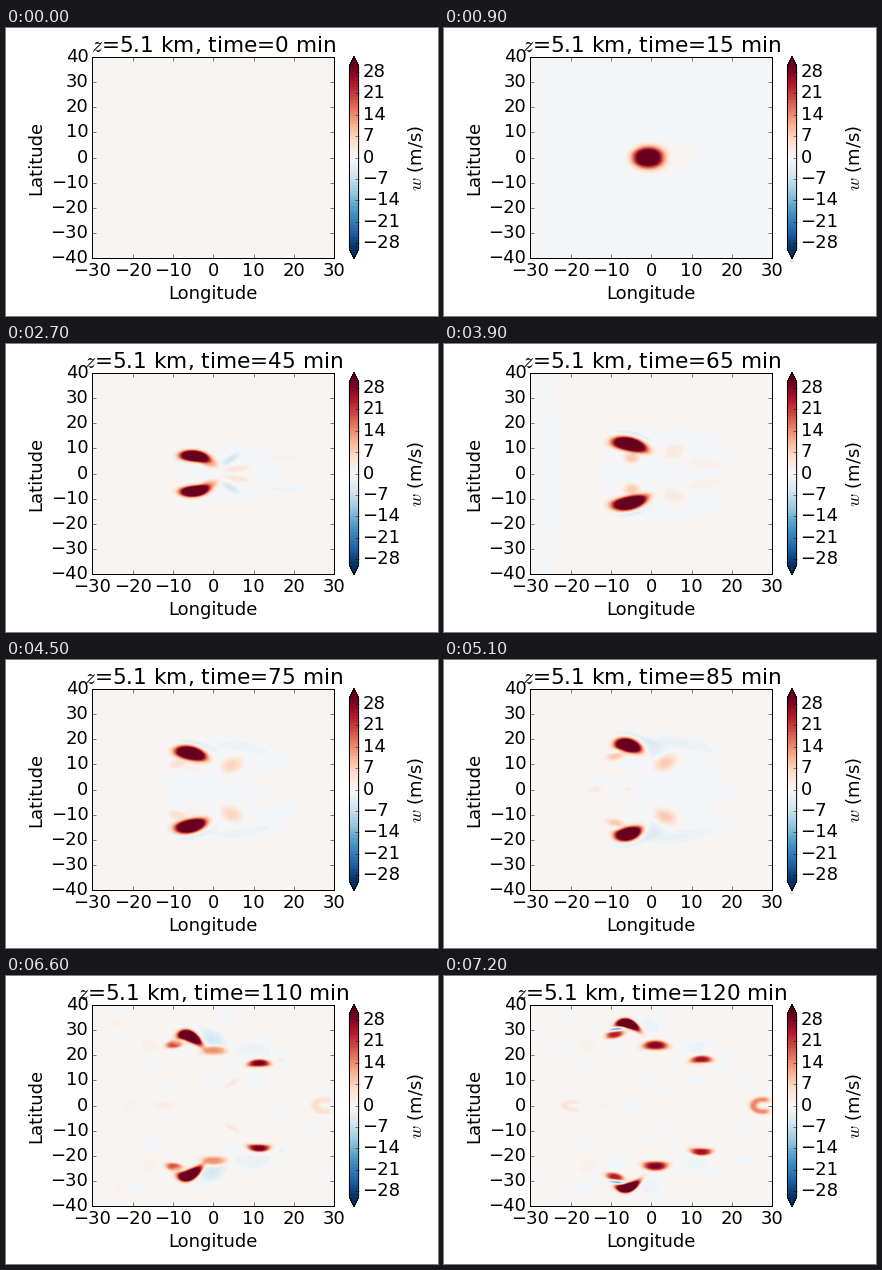
Recreate the animation shown at these times as a matplotlib script. Size 432x288 px, loop 7.5 s.

```python
import numpy as np
import matplotlib.pyplot as plt
from matplotlib.animation import FuncAnimation

plt.style.use("classic")
plt.rcParams.update({
    "font.family": "DejaVu Sans",
    "font.size": 18,
    "mathtext.fontset": "cm",
    "figure.facecolor": "white",
    "savefig.facecolor": "white",
})

FRAMES, INTERVAL, STEP = 25, 300, 5
LEVELS = np.arange(-30, 31)
X, Y = np.meshgrid(np.linspace(-30, 30, 181), np.linspace(-40, 40, 201))


def rise(t, start, end):
    """Smooth step from 0 to 1."""
    s = np.clip((t - start) / (end - start), 0, 1)
    return s * s * (3 - 2 * s)


def pulse(t, start, peak, end):
    return rise(t, start, peak) * (1 - rise(t, peak, end))


def blob(x, y, rx, ry, amp, slope=0, bend=0):
    """Sheared, bent bump; off the equator it is mirrored north to south."""
    u = X - x
    total = 0
    for lat in (Y, -Y) if y else (Y,):
        v = lat - y - slope * u - bend * u**2
        total = total + amp * np.exp(-((u / rx)**2 + (v / ry)**2)**1.5)
    return total


def horseshoe(x, rx, ry, amp, width=0.4):
    """Ring on the equator that opens to the east."""
    u, v = (X - x) / rx, Y / ry
    r = np.hypot(u, v) + 1e-9
    return amp * np.exp(-((r - 1) / width)**2) * (1 - rise(u / r, 0.2, 1))


def background(t):
    """Weak mean motion plus ripples that spread late in the storm."""
    w = 0.25 - 0.65 * rise(t, 0, 5) * (1 - rise(t, 30, 42))
    rng = np.random.default_rng(4)
    ripples = 0
    for _ in range(8):
        kx, ky = rng.uniform(0.15, 0.6, 2)
        phase, speed = rng.uniform(0, 6.3), rng.uniform(-0.06, 0.06)
        ripples = ripples + np.cos(kx * X + phase + speed * t) * np.cos(ky * Y)
    return w + 0.25 * rise(t, 70, 110) * ripples * np.exp(-(X / 32)**4)


def first_updraft(t):
    """Rising bubble with its ring and the sinking wedge in its wake."""
    r = 5 - 0.08 * t
    return (blob(-0.05 * t, 0, r, r + 0.3, 40 * pulse(t, 0, 17, 25))
            + blob(-4.4, 0, 1.1, 2.6, 28 * pulse(t, 15, 24, 35))
            + blob(0.26 * t, 0, 2 + 0.23 * t, 3 + 0.21 * t,
                   4 * pulse(t, 10, 22, 45))
            + blob(0.28 * t, 0, 3.4, 2.8, -9 * pulse(t, 12, 25, 42))
            + blob(2.2, 0, 3, 1.1, -7 * pulse(t, 12, 25, 36)))


def split_cells(t):
    """Pair of storms that drift poleward, with hook, tail and sinking air."""
    s = (t - 25) / 20
    x = -5.9 + 3.3 * np.exp(-max(s, -0.3))
    y = max(2.9 + 4 * s + 0.1 * s**3, 1.5)
    rx = 2.9 + 1.3 * np.exp(-((t - 62) / 20)**2)
    ry = 1.5 + 1.0 * rise(t, 25, 65) - 0.8 * rise(t, 100, 120)
    slope = -0.3 * rise(t, 25, 65) - 0.4 * pulse(t, 85, 100, 125)
    bend = -0.03 - 0.15 * rise(t, 75, 120)
    turn = pulse(t, 85, 100, 118)
    late = rise(t, 75, 110)
    return (blob(x, y, rx, ry, 50 * rise(t, 13, 25), slope, bend)
            + blob(x - 2.6, y - 2.2, 2, 1.2, -22 * late * (1 - turn), 0.3)
            + blob(x - 3.2 - turn, y - 4.3 + 3 * turn, 2.2, 1.5,
                   8 * rise(t, 68, 80) + 16 * rise(t, 85, 100), 0.3)
            + blob(x + 3.6, max(y - 2.7, 2.5), 2.4, 1.6,
                   12 * pulse(t, 15, 35, 75), -0.4)
            + blob(x + 0.6, y - 5.5, 1.9, 2.1, 8 * pulse(t, 48, 65, 80))
            + blob(x + 5.8, y - 1, 3.2, 3.6, -7 * pulse(t, 70, 100, 130), -0.3)
            + blob(x + 0.8, y + 4.2, 5, 1.3, -3.5 * pulse(t, 48, 68, 130),
                   -0.35, -0.05))


def wake(t):
    """Weak bands that trail east of the storms."""
    shift = t - 45
    return (blob(4.2, 5.6, 2.4, 1.8, -5.5 * pulse(t, 26, 45, 65), 0.8)
            + blob(5.8, 1.9, 3.4, 1.2, 3.5 * pulse(t, 30, 45, 60), 0.2)
            + blob(5.5 - 0.1 * (t - 65), 8.7 + 0.1 * (t - 65), 2.6, 2.9,
                   8 * pulse(t, 50, 83, 105), 0.4)
            + blob(4.6, 8.8, 2, 0.9, 6 * pulse(t, 88, 100, 118), 1)
            + blob(18, 6.5 + 0.1 * shift, 5, 1.1, -1.8 * pulse(t, 35, 45, 80),
                   0, -0.05)
            + blob(13, 4, 5, 2, 2 * pulse(t, 48, 65, 82), -0.2)
            + blob(6 + 0.05 * shift, 13 + 0.14 * shift, 9, 2 + 0.02 * shift,
                   -2.5 * pulse(t, 50, 95, 140), -0.25, -0.02)
            + blob(4, 0, 15 + 0.07 * shift, 14 + 0.15 * shift,
                   -0.8 * pulse(t, 28, 60, 115))
            + blob(-31, 0, 8, 60, -0.9 * pulse(t, 52, 65, 80)))


def late_cells(t):
    """New storms along the outflow and small features on the equator."""
    grow = rise(t, 104, 120)
    return (blob(10.2 + 0.11 * (t - 100), 15.4 + 0.15 * (t - 100), 2.7, 1.3,
                 31 * rise(t, 86, 98) - 6 * grow, 0.05, -0.06)
            + blob(1 + 0.07 * (t - 120), 24 + 0.2 * (t - 120), 3, 1.7,
                   29 * rise(t, 100, 120), 0, -0.04)
            + horseshoe(27.6, 2.3, 2.4, 14 * grow)
            + horseshoe(-19.5, 2, 1.5, 4 * grow)
            + blob(-11.6, 0, 3, 1.3, 4.2 * pulse(t, 80, 100, 116))
            + sum(blob(x, 0, 1.5, 0.9, 2.4 * pulse(t, 72, 85, 98))
                  for x in (-14, -6)))


def velocity(t):
    parts = (background, first_updraft, split_cells, wake, late_cells)
    return sum(part(t) for part in parts)


def draw_field(t):
    return ax.contourf(X, Y, velocity(t), LEVELS, cmap="RdBu_r", extend="both")


fig = plt.figure(figsize=(6, 4), dpi=72)
ax = fig.add_axes([0.2, 0.2, 0.56, 0.7])
cax = fig.add_axes([0.795, 0.2, 0.0212, 0.7])
ax.set_xlabel("Longitude")
ax.set_ylabel("Latitude")
title = ax.set_title("")
bar = fig.colorbar(draw_field(0), cax=cax, ticks=np.arange(-28, 29, 7))
bar.set_label("$w$ (m/s)")


def update(i):
    t = i * STEP
    for c in list(ax.collections):
        c.remove()
    draw_field(t)
    ax.set(xlim=(-30, 30), ylim=(-40, 40))
    title.set_text(f"$z$=5.1 km, time={t} min")
    return []


anim = FuncAnimation(fig, update, frames=FRAMES, interval=INTERVAL,
                     repeat=True, repeat_delay=0)
plt.show()
```
